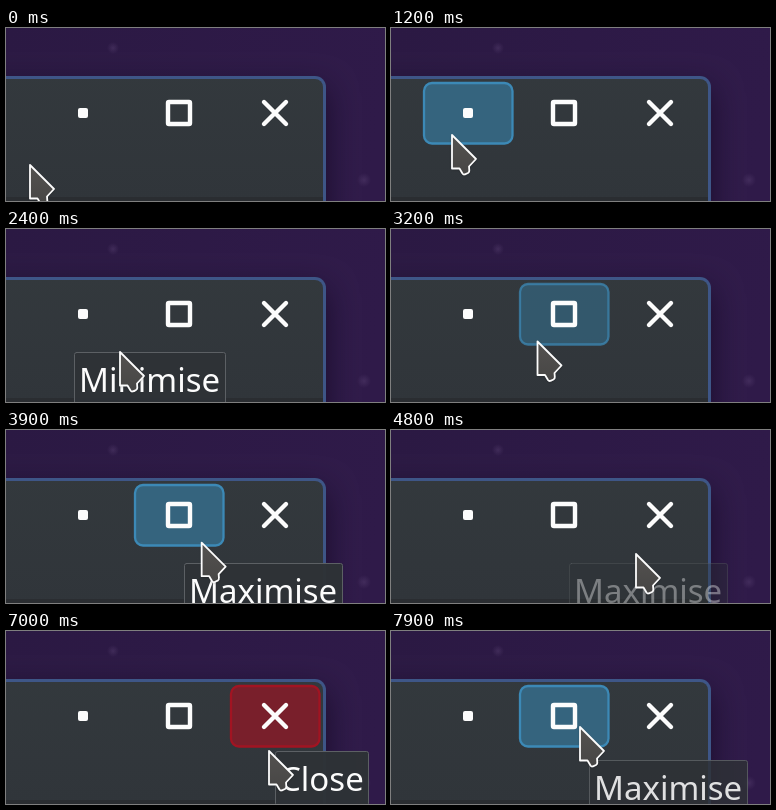
An HTML page with a canvas that plays this animation: 379x173 px, repeating every 8000 ms.

```html
<!DOCTYPE html>
<html lang="en">
<head>
<meta charset="utf-8">
<title>Window buttons</title>
<style>
html, body { margin: 0; height: 100%; overflow: hidden; background: #2d1a48; }
canvas { display: block; }
</style>
</head>
<body>
<canvas id="stage" width="379" height="173"></canvas>
<script>
const c = document.getElementById('stage').getContext('2d');
const LOOP = 8000, STEP = 100, WHITE = '#fcfcfc';
const HOVER_FADE = 150, TIP_IN = 150, TIP_OUT = 400;

// Pointer moves: arrival time, duration, x, y
const home = [23, 136];
const moves = [
  [1200, 700, 60, 106], [1700, 300, 64, 104], [2300, 450, 113, 122],
  [3400, 400, 178, 101], [4100, 600, 203, 117], [4800, 600, 244, 123],
  [5400, 300, 260, 113], [6200, 300, 266, 101], [6400, 100, 280, 101],
  [6800, 200, 263, 117], [7000, 200, 262, 119], [7900, 800, 188, 95]
];

// Tooltips: text, x, y, show time, hide time
const tips = [
  ['Minimise', 68, 123, 1850, 2600], ['Maximise', 178, 133, 3250, 4550],
  ['Close', 269, 120, 5950, 7000], ['Maximise', 198, 129, 7770, LOOP]
];

const BLUE = ['#35647e', '#3c89b6'], RED = ['#791f2b', '#a11422'];
const buttons = [[32, BLUE], [128, BLUE], [224, RED]];

const clamp = v => Math.max(0, Math.min(1, v));

function pointerAt(t) {
  let [x, y] = home;
  for (const [end, span, tx, ty] of moves) {
    const k = clamp((t - end + span) / span);
    x += (tx - x) * k;
    y += (ty - y) * k;
  }
  return [x, y];
}

// Share of the last moments the pointer spent on a button
function hover(left, t) {
  const n = 15;
  let hits = 0;
  for (let i = 0; i < n; i++) {
    const [x, y] = pointerAt(t - i * HOVER_FADE / n);
    if (x >= left && x < left + 90 && y < 120) hits++;
  }
  return hits / n;
}

function box(x, y, w, h, r, fill, stroke, line) {
  c.beginPath();
  c.roundRect(x, y, w, h, r);
  if (fill) { c.fillStyle = fill; c.fill(); }
  if (stroke) { c.strokeStyle = stroke; c.lineWidth = line; c.stroke(); }
}

function gradient(x, y, from, to) {
  const g = c.createLinearGradient(0, 0, x, y);
  g.addColorStop(0, from);
  g.addColorStop(1, to);
  return g;
}

function glow(x, y, r) {
  const g = c.createRadialGradient(x, y, 0, x, y, r);
  g.addColorStop(0, 'rgba(110,85,135,.3)');
  g.addColorStop(1, 'rgba(110,85,135,0)');
  c.fillStyle = g;
  c.fillRect(x - r, y - r, 2 * r, 2 * r);
}

function drawWindow() {
  c.fillStyle = gradient(379, 60, '#2b1943', '#2f1a49');
  c.fillRect(0, 0, 379, 173);
  glow(107, 20, 6);
  glow(358, 152, 7);
  c.save();
  c.shadowColor = 'rgba(10,4,22,.6)';
  c.shadowBlur = 30;
  c.shadowOffsetY = 12;
  box(-40, 48, 360, 200, 11, '#3e5687');
  c.restore();
  box(-40, 51, 357, 200, 8, gradient(0, 173, '#343a3e', '#30353a'));
  c.fillStyle = '#2a2d31';
  c.fillRect(0, 169, 317, 4);
}

function drawIcons() {
  box(72, 80, 10, 10, 2, WHITE);
  box(162, 74, 22, 22, 1, null, WHITE, 4.4);
  c.lineCap = 'round';
  c.beginPath();
  c.moveTo(258, 74); c.lineTo(280, 96);
  c.moveTo(280, 74); c.lineTo(258, 96);
  c.stroke();
}

function drawTip([text, x, y, show, hide], t) {
  c.globalAlpha = clamp((t - show) / TIP_IN) * clamp(1 - (t - hide) / TIP_OUT);
  c.font = '33px "Noto Sans", sans-serif';
  const w = Math.floor(c.measureText(text).width + 11);
  box(x + .5, y + .5, w - 1, 54, 2, 'rgba(46,50,54,.97)', '#5c6064', 1);
  c.fillStyle = WHITE;
  c.fillText(text, x + 5, y + 40);
  c.globalAlpha = 1;
}

const arrow = new Path2D('M1 1V34.5H8.5L11.5 39.5Q12.5 41 14 40.3L17 39Q18.5 38 18.3 36.5L18 32.5L25 25Z');

function drawPointer([x, y]) {
  c.save();
  c.translate(x, y);
  c.shadowColor = 'rgba(0,0,0,.35)';
  c.shadowBlur = 3;
  c.shadowOffsetY = 1;
  c.fillStyle = gradient(0, 40, '#545250', '#474645');
  c.fill(arrow);
  c.shadowColor = 'transparent';
  c.lineJoin = 'round';
  c.lineWidth = 1.8;
  c.strokeStyle = WHITE;
  c.stroke(arrow);
  c.restore();
}

function frame(now) {
  const t = Math.floor(now % LOOP / STEP) * STEP;
  drawWindow();
  for (const [x, [fill, edge]] of buttons) {
    c.globalAlpha = hover(x, t);
    box(x + 1, 55, 88.5, 60.5, 8, fill, edge, 2.3);
  }
  c.globalAlpha = 1;
  drawIcons();
  tips.forEach(tip => drawTip(tip, t));
  drawPointer(pointerAt(t));
}

const start = performance.now();
(function tick() {
  frame(performance.now() - start);
  requestAnimationFrame(tick);
})();
</script>
</body>
</html>
```
